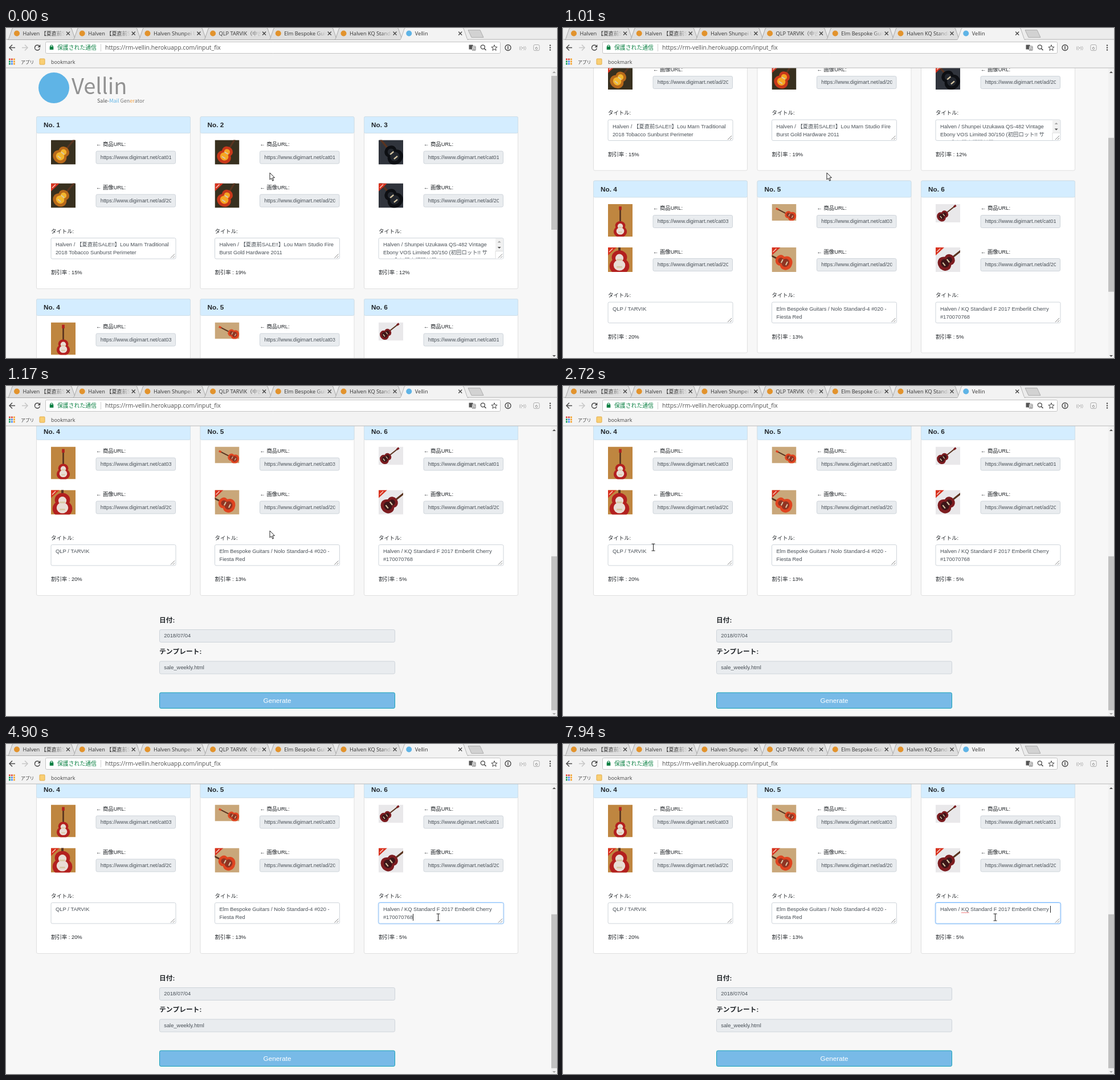
These frames come from a looping animation (967x579 px, 8 s). An HTML page with a canvas:

```html
<!DOCTYPE html>
<html lang="ja">
<head>
<meta charset="utf-8">
<title>Vellin</title>
<style>
html, body { margin: 0; width: 100%; height: 100%; overflow: hidden; }
canvas { display: block; width: 967px; height: 579px; }
</style>
</head>
<body>
<canvas id="stage" width="967" height="579"></canvas>
<script>
const ctx = document.getElementById('stage').getContext('2d', { alpha: false });
const LOOP = 8000;
const BODY = '"Liberation Sans", "Noto Sans CJK JP", sans-serif';
const UI = '"Open Sans", "Noto Sans CJK JP", sans-serif';
const CJK = '"Noto Sans CJK JP", "Noto Sans", sans-serif';
const INK = '#212529', FIELD_INK = '#495057', BLUE = '#5fb4e6', ORANGE = '#f0a044';
const SIZE = 9.4;

const tabs = ['Halven 【夏直前SALE', 'Halven 【夏直前SALE', 'Halven Shunpei Uz', 'QLP TARVIK（中古',
  'Elm Bespoke Guit', 'Halven KQ Standard', 'Vellin'];
const serial = '#170070768';
const lastTitle = 'Halven / KQ Standard F 2017 Emberlit Cherry';
// photo: background, guitar x, y, angle, scale, body, highlight
const cards = [
  { title: ['Halven / 【夏直前SALE!!】Lou Marn Traditional', '2018 Tobacco Sunburst Perimeter'], off: 15, cat: '01', h: 43,
    photo: ['#38301f', 19, 25, 0.7, 1.15, '#b8691a', '#f3b62c'] },
  { title: ['Halven / 【夏直前SALE!!】Lou Marn Studio Fire', 'Burst Gold Hardware 2011'], off: 19, cat: '01', h: 43,
    photo: ['#38301f', 19, 25, 0.55, 1.15, '#c8381a', '#f6a522'] },
  { title: ['Halven / Shunpei Uzukawa QS-482 Vintage', 'Ebony VOS Limited 30/150 (初回ロット!! サ', 'イン入り限定証明付属!!'], off: 12, cat: '01', h: 43,
    photo: ['#30343c', 25, 25, -0.7, 1.3, '#0d0f13', '#23272e'] },
  { title: ['QLP / TARVIK'], off: 20, cat: '03', h: 57,
    photo: ['#bf8640', 21.5, 43, 0, 1.05, '#b3201f', '#e9ddd5'] },
  { title: ['Elm Bespoke Guitars / Nolo Standard-4 #020 -', 'Fiesta Red'], off: 13, cat: '03', h: 29,
    photo: ['#c9a77a', 32, 20, -1.1, 0.75, '#df4420', '#8f3423'] },
  { title: [lastTitle, serial], off: 5, cat: '01', h: 32,
    photo: ['#e9e8ea', 13, 20, 0.9, 0.78, '#7c1c20', '#3c1518'] }
];

const scrollSteps = [[0, 0], [940, 75], [1010, 207.5], [1090, 340], [1170, 410]];
const deletions = [5980, 6150, 6290, 6530, 6680, 6850, 7000, 7240, 7410, 7560];
const caretOn = [[4760, 5290], [5830, 6380], [6850, 7410], [7940, LOOP]];
// start, end, from, control, to
const moves = [
  [1940, 2550, [463, 254], [300, 110], [152, 283]],
  [2650, 3490, [152, 283], [290, 284], [429, 298]],
  [3500, 4120, [429, 298], [600, 296], [754, 309]],
  [4300, 4350, [754, 309], [755, 309], [756, 308.5]],
  [4530, 4740, [756, 308.5], [757, 306], [757.5, 304]]
];

function text(s, x, y, size = SIZE, color = INK, font = BODY, weight = 400) {
  ctx.font = `${weight} ${size}px ${font}`;
  ctx.fillStyle = color;
  ctx.fillText(s, x, y);
  return ctx.measureText(s).width;
}
function rect(x, y, w, h, color) {
  ctx.fillStyle = color;
  ctx.fillRect(x, y, w, h);
}
function box(x, y, w, h, fill, stroke, r = 2.4) {
  ctx.beginPath();
  ctx.roundRect(x, y, w, h, r);
  ctx.fillStyle = fill;
  ctx.fill();
  ctx.lineWidth = 1;
  ctx.strokeStyle = stroke;
  ctx.stroke();
}
function poly(points, fill, stroke, width = 1) {
  ctx.beginPath();
  points.forEach(([x, y]) => ctx.lineTo(x, y));
  if (fill) { ctx.closePath(); ctx.fillStyle = fill; ctx.fill(); }
  if (stroke) { ctx.lineWidth = width; ctx.strokeStyle = stroke; ctx.stroke(); }
}
function disc(x, y, r, fill, stroke, width = 1) {
  ctx.beginPath();
  ctx.arc(x, y, r, 0, 7);
  if (fill) { ctx.fillStyle = fill; ctx.fill(); }
  if (stroke) { ctx.lineWidth = width; ctx.strokeStyle = stroke; ctx.stroke(); }
}
function oval(x, y, rx, ry, fill) {
  ctx.beginPath();
  ctx.ellipse(x, y, rx, ry, 0, 0, 7);
  ctx.fillStyle = fill;
  ctx.fill();
}
function clipped(x, y, w, h, draw) {
  ctx.save();
  ctx.beginPath();
  ctx.rect(x, y, w, h);
  ctx.clip();
  draw();
  ctx.restore();
}
function triangle(x, y, dir, color) {
  poly([[x - 3, y - 1.5 * dir], [x + 3, y - 1.5 * dir], [x, y + 1.5 * dir]], color);
}

function photo(x, y, h, [bg, gx, gy, angle, scale, body, glow], zoomed) {
  clipped(x, y, 43, h, () => {
    rect(x, y, 43, h, bg);
    ctx.save();
    ctx.translate(x + gx, y + gy);
    ctx.rotate(angle);
    ctx.scale(scale, scale);
    rect(-1.3, -32, 2.6, 30, '#5a3420');
    rect(-2.2, -37, 4.4, 6, body);
    oval(0, 5, 11, 9.5, body);
    oval(0, -5, 8.5, 7.5, body);
    oval(0, 4, 6.5, 6, glow);
    oval(0, -4, 4.5, 4.5, glow);
    rect(-3, -3, 6, 1.8, '#d8c8a4');
    rect(-3, 5, 6, 1.8, '#d8c8a4');
    ctx.restore();
    if (zoomed) {
      poly([[x, y], [x + 15, y], [x, y + 14]], '#d8321f');
      poly([[x + 2, y + 8], [x + 8, y + 2]], null, '#f6cfc4', 1.5);
    }
  });
}

function field(x, y, w, value) {
  box(x, y, w, 22, '#e9ecef', '#ced4da');
  clipped(x + 7, y, w - 14.5, 22, () => text(value, x + 7.7, y + 13.8, SIZE, FIELD_INK));
}

function titleArea(x, y, lines, ring) {
  if (ring) {
    ctx.globalAlpha = ring;
    box(x - 1, y - 1, 221, 38.5, '#fff', '#bfdeff', 3.4);
    ctx.globalAlpha = 1;
  }
  box(x, y, 219, 36.5, '#fff', '#ced4da');
  if (ring) {
    ctx.globalAlpha = ring;
    box(x, y, 219, 36.5, '#fff', '#80bdff');
    ctx.globalAlpha = 1;
  }
  clipped(x + 1, y + 1, 217, 34.5, () =>
    lines.forEach((line, i) => text(line, x + 7.9, y + 14.6 + i * 14.1, SIZE, FIELD_INK)));
  if (lines.length > 2) {
    rect(x + 205, y + 0.7, 13, 22, '#f1f1f1');
    triangle(x + 211.7, y + 6.5, -1, '#a3a3a3');
    triangle(x + 211.7, y + 17, 1, '#505050');
    rect(x + 205, y + 23, 13, 13, '#fff');
    poly([[x + 205, y + 36], [x + 205, y + 23], [x + 218, y + 23]], null, '#dcdcdc');
  }
  for (const d of [3, 7]) poly([[x + 217 - d, y + 35], [x + 217, y + 35 - d]], null, '#777', 0.9);
}

function card(i, t) {
  const { title, off, cat, h, photo: pic } = cards[i];
  const x = 53.5 + 287.5 * (i % 3), y = 155.5 + 320 * (i > 2);
  box(x, y, 270, 302, '#fff', '#dfdfdf');
  box(x, y, 270, 29, '#d4edff', '#cfdfe9');
  text(`No. ${i + 1}`, x + 12.5, y + 18.8, 11.75, INK, BODY, 700);
  photo(x + 25.5, y + 41, h, pic);
  const big = [...pic];
  if (i > 2) {
    big[1] = 20; big[2] = 25; big[4] *= 1.5;
  }
  photo(x + 25.5, y + 117, 43, big, true);
  text('← 商品URL:', x + 104.5, y + 51.2);
  field(x + 104.5, y + 60.5, 139.5, `https://www.digimart.net/cat${cat}/`);
  text('← 画像URL:', x + 104.5, y + 127.5);
  field(x + 104.5, y + 136.5, 139.5, 'https://www.digimart.net/ad/2018');
  text('タイトル:', x + 25.5, y + 204);
  const ring = i === 5 ? Math.max(0, Math.min(1, (t - 4740) / 200)) : 0;
  titleArea(x + 25.5, y + 213, i === 5 ? editedTitle(t) : title, ring);
  text(`割引率 : ${off}%`, x + 25.5, y + 276.8);
  if (i === 5) editMarks(x + 33.4, y + 227.6, t);
}

function editedTitle(t) {
  const left = serial.slice(0, serial.length - deletions.filter(d => t >= d).length);
  // a lone character fits back on the first line
  return left.length > 1 ? [lastTitle, left] : [`${lastTitle} ${left}`];
}

function editMarks(x, y, t) {
  const lines = editedTitle(t), row = lines.length - 1;
  ctx.font = `${SIZE}px ${BODY}`;
  const width = s => ctx.measureText(s).width;
  if (t >= 4970) {
    const from = x + width('Halven / '), to = from + width('KQ'), wave = [];
    for (let wx = from, k = 0; wx <= to; wx += 1.5, k++) wave.push([wx, y + 2.3 + (k % 2)]);
    poly(wave, null, '#e8474a', 0.8);
  }
  if (caretOn.some(([a, b]) => t >= a && t < b))
    rect(Math.round(x + width(lines[row])), Math.round(y + row * 14.1 - 9), 1, 12, '#222');
}

function page(t, scroll) {
  rect(0, 70, 967, 509, '#f7f7f7');
  clipped(0, 70, 957, 509, () => {
    ctx.translate(0, -scroll);
    disc(84, 105, 27, BLUE);
    text('Vellin', 115, 116, 38, '#929292', CJK);
    let x = 160;
    for (const [part, color] of [['Sale-', '#555'], ['Mail', BLUE], [' Gen', '#777'], ['er', ORANGE], ['ator', '#777']])
      x += text(part, x, 131, 9, color, CJK, 500);
    cards.forEach((_, i) => card(i, t));
    text('日付:', 269, 824.5, 11.75, INK, BODY, 700);
    field(269.5, 837.5, 413, '2018/07/04');
    text('テンプレート:', 269, 880, 11.75, INK, BODY, 700);
    field(269.5, 893, 413, 'sale_weekly.html');
    box(269.5, 948, 413, 27.5, '#78bae7', '#17a2b8');
    ctx.textAlign = 'center';
    text('Generate', 476, 965.5, 11.75, '#fff');
    ctx.textAlign = 'left';
  });
  rect(957, 70, 10, 509, '#f1f1f1');
  rect(957, 84 + scroll * 0.524, 10, 270, '#c1c1c1');
  triangle(962, 77.5, -1, scroll ? '#505050' : '#a3a3a3');
  triangle(962, 575.5, 1, scroll === 410 ? '#a3a3a3' : '#505050');
}

function tab(title, i) {
  const x = 3 + 114.7 * i, active = i === 6;
  poly([[x, 20.5], [x + 2, 18.5], [x + 8, 1], [x + 10, -0.5], [x + 110, -0.5], [x + 112, 1], [x + 118, 18.5], [x + 120, 20.5]],
    active ? '#f3f3f3' : '#dfdfdf', active ? '#b5b5b5' : '#a9a9a9');
  disc(x + 16, 9.5, 5, active ? BLUE : '#e2932d');
  const fade = ctx.createLinearGradient(x + 80, 0, x + 101, 0);
  fade.addColorStop(0, '#333');
  fade.addColorStop(1, 'rgba(51,51,51,0)');
  clipped(x, 0, 101, 20, () => text(title, x + 26.5, 12.8, 9.2, fade, UI));
  for (const s of [-1, 1]) poly([[x + 103, 9.5 - 3 * s], [x + 109, 9.5 + 3 * s]], null, '#444', 1.3);
}

function chrome() {
  rect(0, 0, 967, 70, '#f3f3f3');
  rect(0, 0, 967, 20, '#ececec');
  rect(0, 19.5, 967, 1, '#b5b5b5');
  tabs.forEach(tab);
  rect(692.5, 20, 117, 1.5, '#f3f3f3');
  poly([[811, 3.5], [832, 3.5], [838, 16.5], [817, 16.5]], '#d2d2d2', '#adadad');

  for (const [x, dir, color] of [[11, 1, '#4b4b4b'], [33, -1, '#c6c6c6']]) {
    poly([[x + 5 * dir, 34.5], [x - 4.5 * dir, 34.5]], null, color, 1.5);
    poly([[x, 29.5], [x - 5 * dir, 34.5], [x, 39.5]], null, color, 1.5);
  }
  ctx.beginPath();
  ctx.arc(55, 34.5, 4.5, 0.3, 5.5);
  ctx.lineWidth = 1.5;
  ctx.strokeStyle = '#4b4b4b';
  ctx.stroke();
  poly([[60.3, 29], [60.3, 34], [55.5, 34]], '#4b4b4b');

  box(69.5, 24.5, 798, 20, '#fff', '#c3c3c3', 2);
  disc(80, 32, 2, null, '#0b8043', 1.2);
  rect(76.7, 32.5, 6.6, 5.5, '#0b8043');
  text('保護された通信', 90, 38, 9.85, '#0b8043', UI);
  rect(166, 28, 1, 13, '#cfcfcf');
  text('https://rm-vellin.herokuapp.com/input_fix', 174, 38, 10.4, '#505050', UI);

  rect(812.5, 29.5, 7, 8, '#555');
  box(818, 32, 6, 7, '#fff', '#777', 0.5);
  text('文', 818.5, 38, 5.5, '#555', CJK);
  disc(836.8, 33.3, 3.5, null, '#444', 1.3);
  poly([[839.4, 36], [842.5, 39]], null, '#444', 1.6);
  const star = [];
  for (let k = 0; k < 10; k++) {
    const a = k * Math.PI / 5, r = k % 2 ? 2.3 : 5.4;
    star.push([857 + r * Math.sin(a), 35 - r * Math.cos(a)]);
  }
  star.push(star[0]);
  poly(star, '#fff', '#444');
  disc(881, 34.5, 5, null, '#444', 1.3);
  rect(880.3, 31.5, 1.4, 6, '#444');
  text('((•))', 900.5, 37, 7.5, '#999');
  box(926, 29.5, 10, 10, '#f8f8f8', '#aaa', 2);
  text('6', 928.8, 37.5, 8, '#777');
  for (const y of [30.5, 34.5, 38.5]) disc(955, y, 1.2, '#4b4b4b');

  const dots = ['#db4437', '#db4437', '#f4a22c', '#0f9d58', '#4285f4', '#f4a22c', '#0f9d58', '#4285f4', '#f4a22c'];
  dots.forEach((c, k) => rect(5 + (k % 3) * 4, 53.5 + Math.floor(k / 3) * 4, 2.8, 2.8, c));
  text('アプリ', 26, 62.5, 7.8, '#444', UI);
  box(59, 54, 9, 10, '#f9cf74', '#e2ac48', 1);
  text('bookmark', 79, 62.5, 8.9, '#444', UI);
  rect(0, 69.5, 967, 1, '#b9b9b9');
}

function pointer(t) {
  let x = 463, y = 254;
  for (const [start, end, a, c, b] of moves) {
    if (t < start) break;
    const p = Math.min(1, (t - start) / (end - start)), u = p * p * (3 - 2 * p);
    [x, y] = a.map((v, k) => (1 - u) ** 2 * v + 2 * u * (1 - u) * c[k] + u * u * b[k]);
  }
  const column = (x - 79) % 287.5;
  if (t > 2000 && y > 278 && y < 315 && column >= 0 && column < 219) {
    x = Math.round(x) + 0.5;
    poly([[x, y - 6], [x, y + 6]], null, '#222');
    for (const end of [y - 6, y + 6]) poly([[x - 3, end], [x + 3, end]], null, '#222');
  } else {
    const shape = [[0, 0], [0, 12], [2.8, 9.6], [4.8, 14.2], [6.7, 13.3], [4.8, 8.9], [8.4, 8.6], [0, 0]];
    poly(shape.map(([dx, dy]) => [x + dx, y + dy]), '#fff', '#222');
  }
}

function frame(now) {
  const t = now % LOOP;
  page(t, scrollSteps.findLast(([at]) => t >= at)[1]);
  chrome();
  pointer(t);
  requestAnimationFrame(frame);
}
requestAnimationFrame(frame);
</script>
</body>
</html>
```
